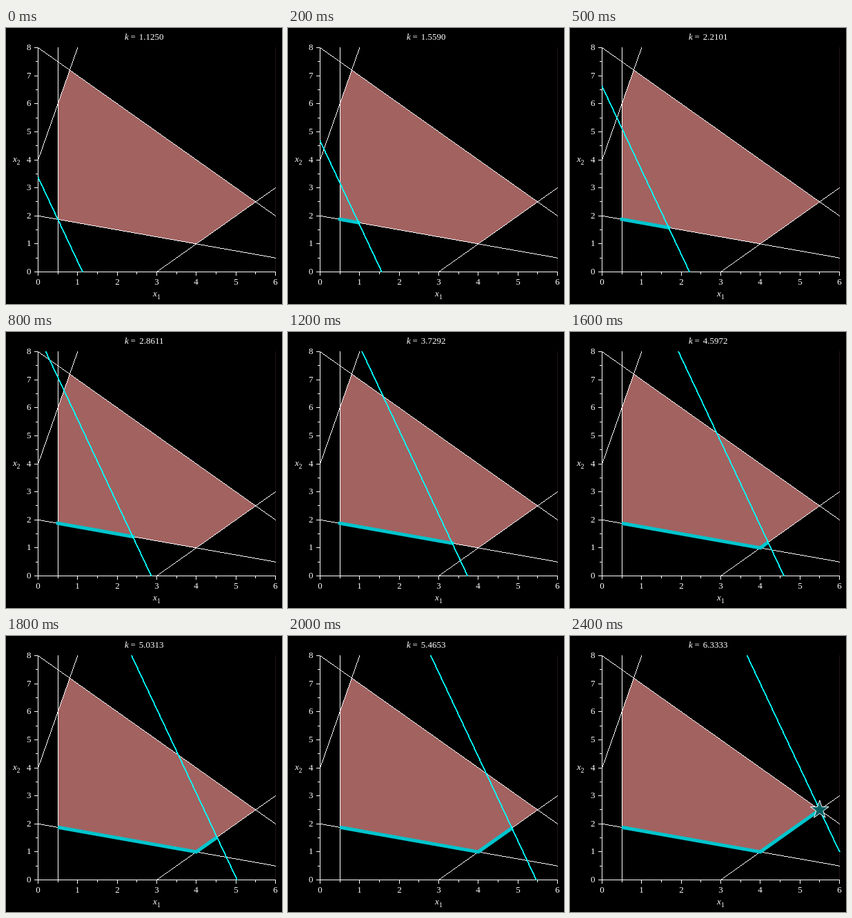
An HTML page with a canvas that plays this animation: 400 px wide and 400 px high, repeating every 2.5 s.

```html
<!DOCTYPE html>
<html lang="en">
<head>
<meta charset="utf-8">
<title>Linear programme</title>
<style>
html, body { margin: 0; width: 100%; height: 100%; overflow: hidden; background: #000; }
canvas { display: block; width: 400px; height: 400px; }
</style>
</head>
<body>
<canvas id="stage" width="400" height="400"></canvas>
<script>
const ctx = document.getElementById('stage').getContext('2d');
const STEPS = 25, STEP_MS = 100, K0 = 1.125, K1 = 19 / 3;
const SERIF = '"Liberation Serif", "Times New Roman", serif';
const CORNER = 13 / 3;
const region = [[0.5, 1.875], [0.5, 6], [0.8, 7.2], [5.5, 2.5], [4, 1]];
const limits = [
  [0.5, 0, 0.5, 8], [0, 8, 6, 2], [0, 4, 1, 8], [0, 2, 6, 0.5], [3, 0, 6, 3]
];

const px = x => 46 + x * 344 / 6;
const py = y => 353 - y * 325 / 8;

// Crisp line without smoothing, w pixels thick across its main direction
function line(x1, y1, x2, y2, color, w = 1) {
  const ax = px(x1), ay = py(y1), dx = px(x2) - ax, dy = py(y2) - ay;
  const n = Math.max(1, Math.round(Math.max(Math.abs(dx), Math.abs(dy))));
  const shift = (w - 1) / 2, steep = Math.abs(dy) > Math.abs(dx);
  ctx.fillStyle = color;
  for (let i = 0; i <= n; i++) {
    const x = ax + dx * i / n, y = ay + dy * i / n;
    if (steep) ctx.fillRect(Math.round(x - shift), Math.round(y), w, 1);
    else ctx.fillRect(Math.round(x), Math.round(y - shift), 1, w);
  }
}

function trace(points) {
  ctx.beginPath();
  for (const [x, y] of points) ctx.lineTo(px(x) + 0.5, py(y) + 0.5);
}

function text(str, x, y, align = 'left', size = 13, style = '') {
  ctx.font = `${style} ${size}px ${SERIF}`;
  ctx.textAlign = align;
  ctx.fillStyle = '#fff';
  ctx.fillText(str, x, y);
}

function axes() {
  ctx.fillStyle = '#fff';
  ctx.fillRect(46, 28, 1, 326);
  ctx.fillRect(46, 353, 345, 1);
  for (let i = 0; i <= 16; i++) {
    const len = i % 2 ? 3 : 5;
    ctx.fillRect(46 - len, Math.round(py(i / 2)), len, 1);
    if (i <= 12) ctx.fillRect(Math.round(px(i / 2)), 354, 1, len);
  }
  for (let i = 0; i <= 8; i++) {
    text(i, 36.5, Math.round(py(i)) + 4, 'right');
    if (i <= 6) text(i, Math.round(px(i)) + 0.5, 372, 'center');
  }
  text('x', 10, 194, 'left', 13, 'italic');
  text('2', 15.5, 198, 'left', 10);
  text('x', 213, 389, 'left', 13, 'italic');
  text('1', 219, 393, 'left', 10);
}

function title(k) {
  text('k', 172, 17, 'left', 13, 'italic');
  text('=', 180.5, 17);
  text(k.toFixed(4), 228.5, 17, 'right');
}

function route(k) {
  const points = [[0.5, 1.875]];
  if (k < CORNER) {
    const x = (3 * k - 2) / 2.75;
    points.push([x, 2 - x / 4]);
  } else {
    const x = (3 * k + 3) / 4;
    points.push([4, 1], [x, x - 3]);
  }
  trace(points);
  ctx.strokeStyle = '#00c5cd';
  ctx.lineWidth = 5;
  ctx.lineCap = k < CORNER ? 'square' : 'butt';
  ctx.lineJoin = 'miter';
  ctx.stroke();
}

function objective(k) {
  const top = k - 8 / 3;
  const start = top >= 0 ? [top, 8] : [0, 3 * k];
  const end = k <= 6 ? [k, 0] : [6, 3 * k - 18];
  line(...start, ...end, '#00ffff', 2);
}

function star(x, y, r) {
  ctx.beginPath();
  for (let i = 0; i < 10; i++) {
    const a = i * Math.PI / 5 - Math.PI / 2, d = i % 2 ? r * 0.382 : r;
    ctx.lineTo(x + d * Math.cos(a), y + d * Math.sin(a));
  }
  ctx.closePath();
  ctx.fillStyle = '#005f63';
  ctx.fill();
  ctx.strokeStyle = '#fff';
  ctx.lineWidth = 1;
  ctx.stroke();
}

function draw(step) {
  const k = K0 + (K1 - K0) * step / (STEPS - 1);
  ctx.fillStyle = '#000';
  ctx.fillRect(0, 0, 400, 400);
  ctx.fillStyle = '#221616';
  ctx.fillRect(390, 28, 1, 325);
  trace(region);
  ctx.fillStyle = '#a26260';
  ctx.fill();
  for (const limit of limits) line(...limit, '#fff');
  axes();
  if (step > 0) route(k);
  objective(k);
  if (step === STEPS - 1) star(px(5.5) + 0.5, py(2.5) + 0.5, 14);
  title(k);
}

let shown = -1, begin = null;
function tick(now) {
  if (begin === null) begin = now;
  const step = Math.floor((now - begin) / STEP_MS) % STEPS;
  if (step !== shown) draw(shown = step);
  requestAnimationFrame(tick);
}
draw(0);
requestAnimationFrame(tick);
</script>
</body>
</html>
```
